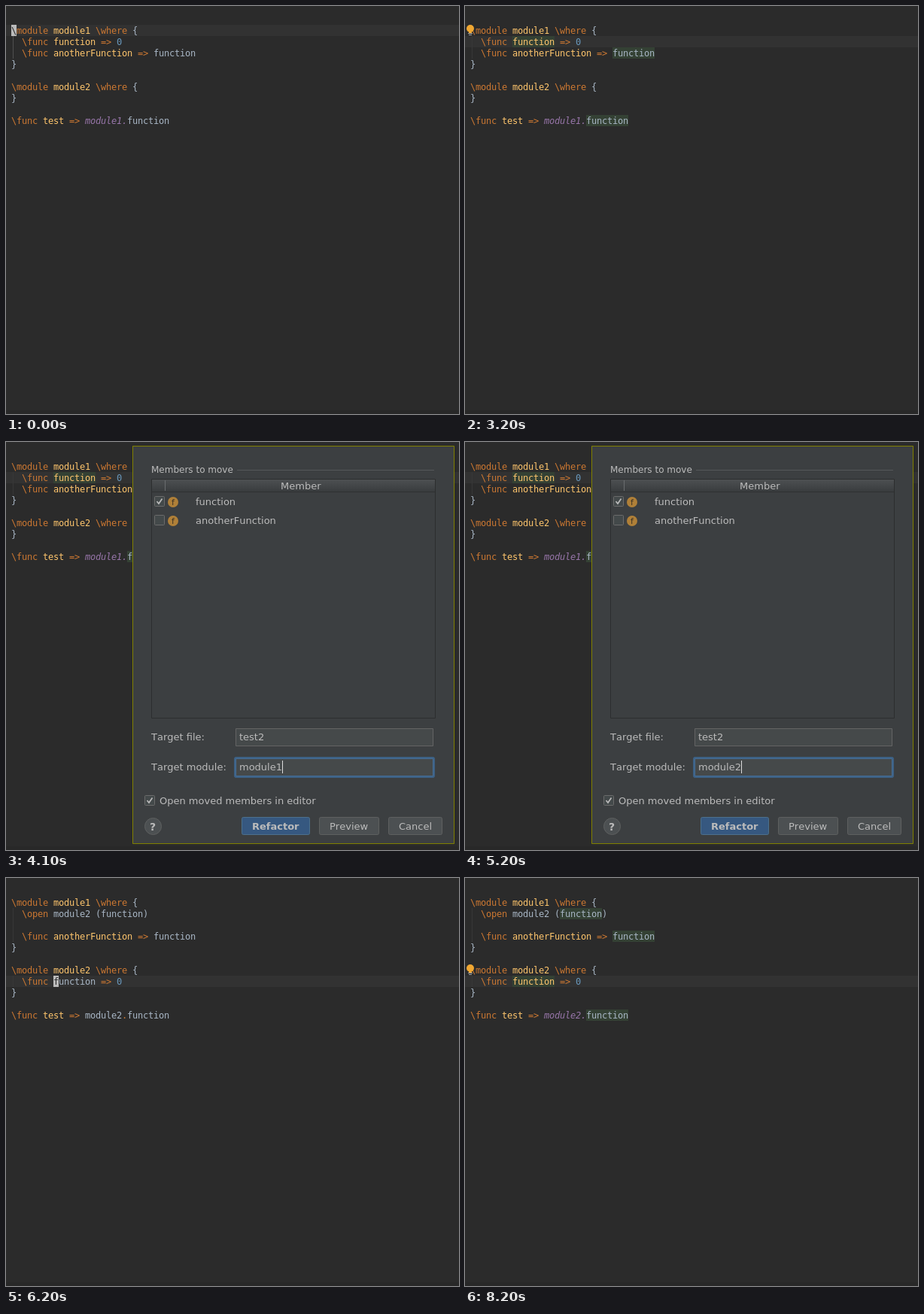
Animation of 602 by 543 pixels, one loop 9.8 s. Source, as an HTML page with a canvas:

```html
<!DOCTYPE html>
<html lang="en">
<head>
<meta charset="utf-8">
<title>Move refactoring</title>
<style>
  html, body { margin: 0; width: 100%; height: 100%; overflow: hidden; background: #2b2b2b; }
  canvas { display: block; }
</style>
</head>
<body>
<canvas id="stage" width="602" height="543"></canvas>
<script>
const ctx = document.getElementById('stage').getContext('2d');
ctx.fontKerning = 'none';

const LOOP = 9800, LEFT = 7, TOP = 25, CELL = 7, ROW = 15;
const MONO = '12px "DejaVu Sans Mono", monospace';
const UI = '"DejaVu Sans", sans-serif';
const ORANGE = '#cc7832', YELLOW = '#ffc66d', BLUE = '#6897bb', PURPLE = '#9876aa',
      PLAIN = '#a9b7c6', LABEL = '#bbbbbb', PANEL = '#3c3f41';

const before = [
  '\\module module1 \\where {',
  '  \\func function => 0',
  '  \\func anotherFunction => function',
  '}', '',
  '\\module module2 \\where {',
  '}', '',
  '\\func test => module1.function'
];
const after = [
  '\\module module1 \\where {',
  '  \\open module2 (function)', '',
  '  \\func anotherFunction => function',
  '}', '',
  '\\module module2 \\where {',
  '  \\func function => 0',
  '}', '',
  '\\func test => module2.function'
];

// [time, column, row]; no position means the block cursor is hidden
const cursorSteps = [
  [0, 0, 0], [100], [600, 0, 0], [1100], [1200, 0, 1], [1800, 2, 1],
  [2200, 8, 1], [3200], [6200, 8, 7], [7200], [7700, 8, 7], [8200]
];

function rect(x, y, w, h, color) {
  ctx.fillStyle = color;
  ctx.fillRect(x, y, w, h);
}

function box(x, y, w, h, radius, fill, border) {
  ctx.beginPath();
  ctx.roundRect(x + .5, y + .5, w - 1, h - 1, radius);
  ctx.fillStyle = fill;
  ctx.fill();
  ctx.strokeStyle = border;
  ctx.lineWidth = 1;
  ctx.stroke();
}

function disc(x, y, r, color) {
  ctx.beginPath();
  ctx.arc(x, y, r, 0, 7);
  ctx.fillStyle = color;
  ctx.fill();
}

function label(text, x, y, font = '13px', color = LABEL) {
  ctx.font = `${font} ${UI}`;
  ctx.fillStyle = color;
  ctx.fillText(text, x, y);
}

function mono(text, col, row, color, style = '') {
  ctx.font = `${style} ${MONO}`;
  ctx.fillStyle = color;
  [...text].forEach((c, i) => ctx.fillText(c, LEFT + (col + i) * CELL, TOP + row * ROW + 12));
}

function codeLine(line, row, resolved, marked) {
  let last = '';
  for (const { 0: word, index } of line.matchAll(/\\?\w+|=>|\S/g)) {
    const qualifier = resolved && (word === '.' || line[index + word.length] === '.');
    const declared = /^\\(module|func)$/.test(last) && (resolved || word !== 'function');
    const color = qualifier ? PURPLE
      : /^(\\|=>|\.)/.test(word) ? ORANGE
      : /^\d/.test(word) ? BLUE
      : declared ? YELLOW : PLAIN;
    if (marked && word === 'function')
      rect(LEFT + index * CELL, TOP + row * ROW, word.length * CELL, ROW, '#344134');
    mono(word, index, row, color, qualifier ? 'italic' : '');
    last = word;
  }
}

function bulb(y) {
  disc(7, y + 5, 5, '#f0a732');
  rect(5, y + 9, 4, 2, '#f0a732');
  rect(4, y + 11, 6, 1, '#a0a3a5');
  rect(5, y + 13, 4, 1, '#a0a3a5');
}

function editor(t) {
  const moved = t >= 6200;
  const lines = moved ? after : before;
  const resolved = !moved || t >= 6500;
  const marked = moved ? t >= 6500 : t >= 2700;
  const caretRow = moved ? 7 : t >= 1200 ? 1 : 0;

  rect(0, 0, 602, 543, '#2b2b2b');
  rect(0, 538, 602, 5, '#282828');
  rect(0, TOP + caretRow * ROW, 602, ROW, '#323232');
  rect(9, 40, 1, moved ? 45 : 30, t < 1800 ? '#505050' : '#373737');
  if (moved) rect(9, 130, 1, 15, '#373737');
  lines.forEach((line, row) => codeLine(line, row, resolved, marked));

  const [, col, row] = cursorSteps.findLast(step => step[0] <= t);
  if (row !== undefined) {
    rect(LEFT + col * CELL, TOP + row * ROW, CELL, ROW, LABEL);
    mono(lines[row][col], col, row, '#2b2b2b');
  }
  if (t >= 3200 && t < 3300) bulb(25);
  if (t >= 7000) bulb(115);
}

function checkbox(x, y, checked) {
  box(x, y, 14, 14, 1, '#43494a', '#6b6b6b');
  if (!checked) return;
  ctx.beginPath();
  ctx.moveTo(x + 3.5, y + 7);
  ctx.lineTo(x + 6, y + 10);
  ctx.lineTo(x + 10.5, y + 3.5);
  ctx.strokeStyle = LABEL;
  ctx.lineWidth = 1.7;
  ctx.stroke();
}

function member(name, y, checked) {
  checkbox(197, y - 7, checked);
  disc(222, y + 1, 7, '#b08038');
  label('f', 220, y + 5, '11px', '#3a3024');
  label(name, 252, y + 5);
}

function field(y, text, focused, caret, selected) {
  if (focused) box(303, y - 2, 267, 28, 2, '#3d6185', '#3d6185');
  box(305, y, 263, 24, 0, '#45494a', focused ? '#466d94' : '#646464');
  ctx.font = `13px ${UI}`;
  const end = Math.round(310 + ctx.measureText(text).width);
  if (selected) rect(310, y + 3, end - 310, 17, '#2f65ca');
  label(text, 310, y + 16);
  if (caret) rect(end, y + 3, 1, 17, '#dddddd');
}

function button(text, x, w, textX, primary) {
  box(x, 499, w, 24, 2, primary ? '#365880' : '#4c5052', primary ? '#4c708c' : '#5e6060');
  label(text, textX, 516, primary ? 'bold 13px' : '13px');
}

function dialog(t) {
  rect(168, 5, 428, 530, PANEL);
  if (t >= 6100) return;
  box(168, 5, 428, 530, 0, PANEL, '#808000');

  label('Members to move', 193, 41, '12px');
  rect(307, 37, 262, 1, '#555759');

  box(193, 49, 378, 319, 0, PANEL, '#2c2e2f');
  const shade = ctx.createLinearGradient(0, 50, 0, 67);
  shade.addColorStop(0, '#4d5052');
  shade.addColorStop(1, '#383b3d');
  rect(194, 50, 376, 17, shade);
  rect(194, 66, 376, 1, '#2f3132');
  rect(211, 51, 1, 14, '#6a6d6f');
  label('Member', 365, 63);
  member('function', 79, true);
  member('anotherFunction', 104, false);

  const inFile = t < 4100;
  const caretOn = t < 3900 || !inFile && t < 4600 || t >= 5100 && t < 5700;
  const target = t < 5100 ? 'module1' : t < 5200 ? 'module' : 'module2';
  label('Target file:', 193, 397);
  field(381, 'test2', inFile, inFile && caretOn, inFile);
  label('Target module:', 193, 437);
  field(421, target, !inFile, !inFile && caretOn);

  checkbox(184, 470, true);
  label('Open moved members in editor', 204, 482);

  box(184, 500, 23, 23, 11, '#4c5052', '#5e6060');
  label('?', 191, 517, 'bold 14px');
  button('Refactor', 313, 91, 327, true);
  button('Preview', 416, 80, 430);
  button('Cancel', 508, 72, 522);
}

function draw() {
  const t = performance.now() % LOOP;
  editor(t);
  if (t >= 3300 && t < 6200) dialog(t);
  requestAnimationFrame(draw);
}
draw();
</script>
</body>
</html>
```
